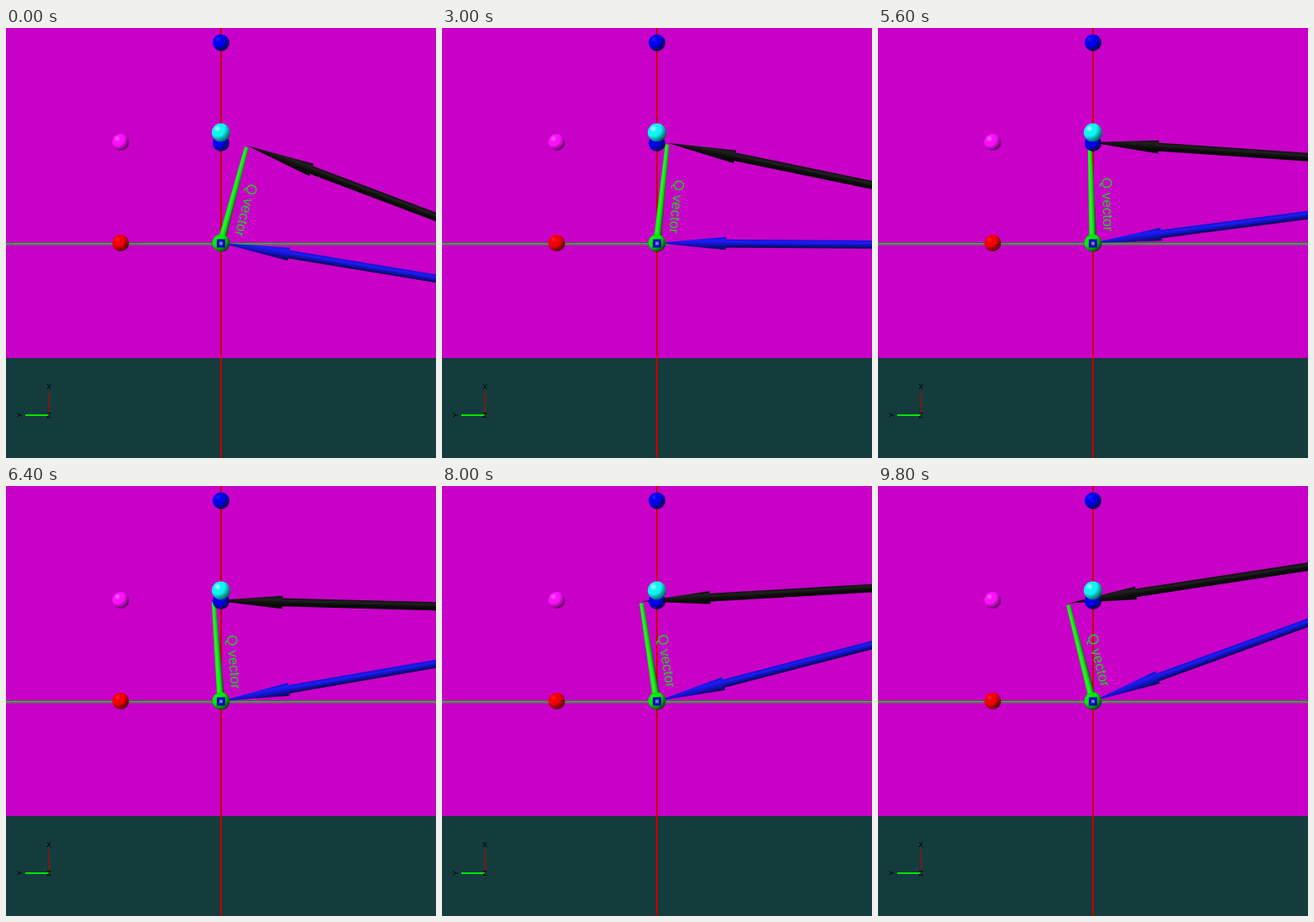
Recreate the animation shown at these times as an HTML page with a canvas. Size 512 px wide and 512 px high, loop 10000 ms.

```html
<!DOCTYPE html>
<html lang="en">
<head>
<meta charset="utf-8">
<title>Q vector</title>
<style>
  html, body { margin: 0; width: 100%; height: 100%; overflow: hidden; background: #c800c8; }
  canvas { display: block; width: 512px; height: 512px; }
</style>
</head>
<body>
<canvas id="stage" width="512" height="512"></canvas>
<script>
const ctx = document.getElementById('stage').getContext('2d');
const STEP_MS = 200, STEPS = 50, TURN = 0.6, CENTER = 256, REACH = 120;
const rad = degrees => degrees * Math.PI / 180;

function rect(color, x, y, w, h) {
  ctx.fillStyle = color;
  ctx.fillRect(x, y, w, h);
}

function polygon(fill, points) {
  ctx.fillStyle = fill;
  ctx.beginPath();
  points.forEach(([x, y]) => ctx.lineTo(x, y));
  ctx.fill();
}

// Draw in a local frame placed at (x, y) and turned clockwise.
function placed(x, y, degrees, draw) {
  ctx.save();
  ctx.translate(x, y);
  ctx.rotate(rad(degrees));
  draw();
  ctx.restore();
}

// Shading across a round rod lying along the local x axis, lit from above.
function rodShade(half, edge, middle, far) {
  const shade = ctx.createLinearGradient(0, -half, 0, half);
  shade.addColorStop(0, edge);
  shade.addColorStop(0.3, middle);
  shade.addColorStop(0.55, edge);
  shade.addColorStop(1, far);
  return shade;
}

function arrow(x, y, degrees, edge, middle, far) {
  placed(x, y, degrees, () => {
    rect(rodShade(4.9, edge, middle, far), 80, -4.9, 420, 9.8);
    polygon(rodShade(7.8, edge, middle, far), [[0, 0], [82, -7.8], [82, 7.8]]);
  });
}

// Ball lit from the upper left, falling into shadow at the lower right.
function sphere(x, y, r, light, base, dark) {
  const shade = ctx.createRadialGradient(x - r * 0.38, y - r * 0.42, 0, x - r * 0.38, y - r * 0.42, r * 1.57);
  shade.addColorStop(0, light);
  shade.addColorStop(0.25, base);
  shade.addColorStop(0.5, base);
  shade.addColorStop(1, dark);
  ctx.fillStyle = shade;
  ctx.beginPath();
  ctx.arc(x, y, r, 0, 2 * Math.PI);
  ctx.fill();
}

function label(text, x, y, degrees = 0) {
  placed(x, y, degrees, () => {
    ctx.font = '9px "Liberation Sans", sans-serif';
    ctx.textAlign = 'center';
    ctx.textBaseline = 'middle';
    ctx.fillStyle = '#000';
    ctx.fillText(text, 0, 0);
  });
}

function scene() {
  rect('#c800c8', 0, 0, 512, 393);
  rect('#143c3c', 0, 393, 512, 119);
  rect('#c80000', 255, 0, 2, 512);
  rect('#00c800', 0, 256, 512, 2);
}

function axesMarker() {
  rect('#c80000', 51, 433, 1, 28);
  rect('#00e600', 23, 460, 28, 2);
  label('X', 51, 427.5);
  label('Y', 17, 461, -90);
  label('Z', 51, 462);
}

function qVector(angle) {
  placed(CENTER, CENTER, angle, () => {
    const shade = ctx.createLinearGradient(-4.5, 0, 4.5, 0);
    shade.addColorStop(0, '#18d818');
    shade.addColorStop(0.35, '#20ff20');
    shade.addColorStop(0.65, '#1cc81c');
    shade.addColorStop(1, '#083808');
    polygon(shade, [[-4.5, 0], [-2.4, -REACH + 2], [2.4, -REACH + 2], [4.5, 0]]);
    placed(13, -77.5, 90, () => {
      ctx.font = '17px "Liberation Sans", Arial, sans-serif';
      ctx.textAlign = 'left';
      ctx.textBaseline = 'alphabetic';
      ctx.fillStyle = '#20d020';
      ctx.fillText('Q vector', 0, 0);
    });
  });
}

function spheres() {
  sphere(256, 17.5, 10, '#2020ff', '#0000f0', '#000030');
  sphere(256, 137, 10, '#2020ff', '#0000f0', '#000030');
  sphere(256, 124.5, 11, '#b0ffff', '#10f4f4', '#044c50');
  sphere(136.5, 136, 10, '#ff70ff', '#fc10fc', '#500850');
  sphere(136.5, 256, 10, '#ff2020', '#f40000', '#380000');
  sphere(256, 256, 10.5, '#20ff20', '#00e800', '#003800');
  rect('#0000c8', 251, 251.5, 10, 10);
  rect('#7080b0', 254, 254.5, 4, 4);
}

function draw(now) {
  const step = Math.floor(now / STEP_MS) % STEPS;
  const turned = TURN * step;
  const angle = 15 - turned;
  const tipX = CENTER + REACH * Math.sin(rad(angle));
  const tipY = CENTER - REACH * Math.cos(rad(angle));

  scene();
  axesMarker();
  arrow(CENTER, CENTER, 9.4 - turned, '#1414c8', '#1c1cf8', '#040448');
  arrow(tipX, tipY, 20.7 - turned, '#101010', '#202020', '#000');
  qVector(angle);
  spheres();
}

const start = performance.now();
function tick() {
  draw(performance.now() - start);
  requestAnimationFrame(tick);
}
tick();
</script>
</body>
</html>
```
